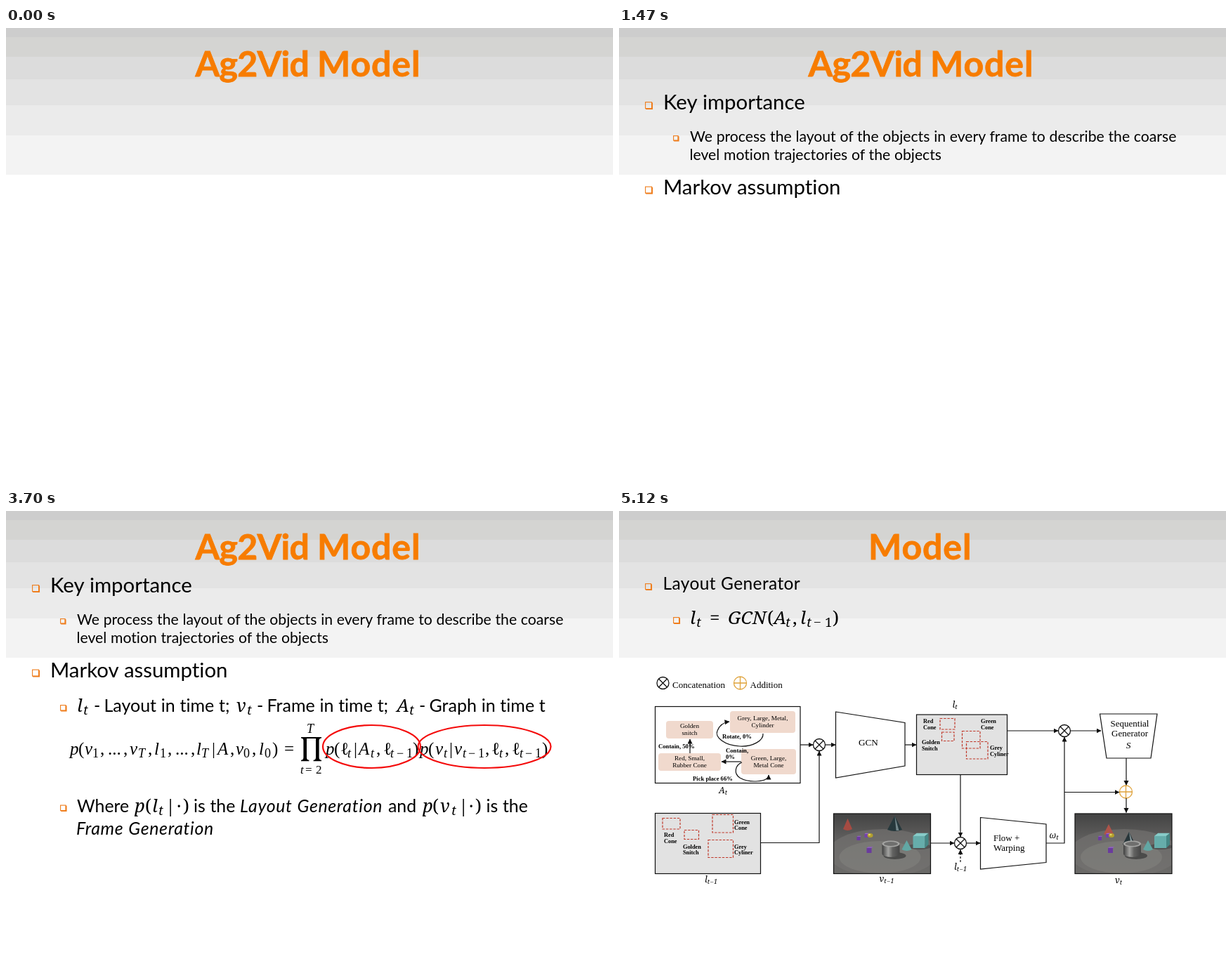
These frames come from a looping animation (864 by 648 pixels, 8 s). An HTML page:

```html
<!DOCTYPE html>
<html lang="en">
<head>
<meta charset="utf-8">
<title>Ag2Vid Model</title>
<style>
  html, body { margin: 0; width: 100%; height: 100%; overflow: hidden; background: #fff; }
  svg { display: block; width: 864px; height: 648px; }
  text { font-variant-ligatures: none; }
  .sans { font-family: Lato, Carlito, sans-serif; word-spacing: .015em; }
  .serif { font-family: "Liberation Serif", "Noto Serif", serif; }
  .noto { font-family: "Noto Serif", "Liberation Serif", serif; }
  .title { font-size: 50px; font-weight: 700; fill: #f77c00; stroke: #f77c00; stroke-width: .8px; }
  .it { font-style: italic; }
  .sans.it { letter-spacing: .7px; }
  .b { font-weight: 700; }
  .mid { text-anchor: middle; }
  .line { fill: none; stroke: #111; stroke-width: 1.2; }
  .box { fill: #fff; stroke: #111; stroke-width: 1.2; }
  .layout { fill: #e2e2e2; stroke: #111; stroke-width: 1.2; }
  .dash { fill: none; stroke: #c0392b; stroke-width: 1.2; stroke-dasharray: 3.4 1.8; }
  .pink { fill: #f0d9cd; }
  .ring { fill: none; stroke: #f40b0b; stroke-width: 2.2; }
</style>
</head>
<body>
<svg id="stage" viewBox="0 0 864 648" xmlns="http://www.w3.org/2000/svg"></svg>
<script>
const LOOP = 8000;

const text = (x, y, size, s, cls = 'sans') =>
  `<text x="${x}" y="${y}" font-size="${size}" class="${cls}">${s}</text>`;
const serif = (x, y, size, s, cls = '') => text(x, y, size, s, 'serif ' + cls);
const title = (x, s, spacing) =>
  `<text x="${x}" y="69" class="sans title" letter-spacing="${spacing}">${s}</text>`;
const rect = (x, y, x2, y2, cls, extra = '') =>
  `<rect x="${x}" y="${y}" width="${x2 - x}" height="${y2 - y}" class="${cls}" ${extra}/>`;
const fill = (d, color) => `<path d="${d}" fill="${color}"/>`;
const path = (d, cls = 'line', extra = '') => `<path d="${d}" class="${cls}" ${extra}/>`;
const arrow = (d, extra = '') => path(d, 'line', 'marker-end="url(#head)" ' + extra);
const oval = (cx, cy, rx, ry, color, extra = '') =>
  `<ellipse cx="${cx}" cy="${cy}" rx="${rx}" ry="${ry}" fill="${color}" ${extra}/>`;

// Small square with a heavier right and bottom edge
const bullet = (x, y, s) =>
  `<g fill="none" stroke="#ef7d1c"><rect x="${x + .6}" y="${y + .6}" width="${s - 2}" height="${s - 2}" stroke-width="1.1"/>` +
  `<path d="M${x + 1.2} ${y + s - .9}H${x + s - .9}V${y + 1.2}" stroke-width="1.9"/></g>`;

// Tokens are "x:glyphs"; a leading underscore sets a subscript
const math = (y, size, tokens, face = 'serif') => tokens.split(' ').map(tok => {
  const [x, body] = tok.split(/:(.+)/);
  const sub = body[0] === '_';
  const s = sub ? body.slice(1) : body;
  const runs = s.replace(/[A-Za-z]+/g, '<tspan font-style="italic">$&</tspan>');
  return text(x, sub ? y + size * .17 : y, sub ? size * .72 : size, runs, face);
}).join('');

// Centred variable with a subscript
const label = (x, y, v, sub) =>
  text(x, y, 12.5, `${v}<tspan font-size="9" dy="2.2">${sub}</tspan>`, 'noto it mid');

const cross = (cx, cy, r, turn, color) =>
  `<g transform="translate(${cx} ${cy}) rotate(${turn})" fill="none" stroke="${color}" stroke-width="1.3">` +
  `<circle r="${r}"/><path d="M${-r} 0H${r}M0 ${-r}V${r}"/></g>`;
const times = (x, y) => cross(x, y, 8.5, 45, '#111');
const plus = (x, y) => cross(x, y, 9, 0, '#dfa23a');

const stack = (x, y, step, size, lines, cls) =>
  lines.split('/').map((s, i) => serif(x, y + i * step, size, s, cls)).join('');
const tag = (x, y, lines) => stack(x, y, 8.7, 8.3, lines, 'b');
const node = (x, y, x2, y2, base, lines) =>
  rect(x, y, x2, y2, 'pink', 'rx="4"') + stack((x + x2) / 2, base, 10, 9.2, lines, 'mid');

function cone(x, y, w, h, color) {
  return fill(`M${x} ${y}L${x + w / 2} ${y + h}Q${x} ${y + h + 4} ${x - w / 2} ${y + h}Z`, color);
}
function cube(x, y, s, color, top) {
  return fill(`M${x} ${y}h${s}v${s}h${-s}z`, color) +
    fill(`M${x} ${y}l${s * .3} ${-s * .25}h${s}l${-s * .3} ${s * .25}z`, top);
}

// Rendered table-top scene; the two cones sit elsewhere once moved
function scene(x, moved) {
  const g = oval(70, 56, 78, 34, '#777673', 'opacity=".6"') +
    oval(66, 62, 58, 23, '#8a8986', 'opacity=".4"') +
    oval(87, 60, 16, 5, '#4b4b4a') + oval(122, 47, 17, 4, '#525252') +
    (moved ? cone(48, 15, 14, 14, '#ad5449') : cone(20, 7, 13, 15, '#a64b42')) +
    (moved ? cone(77, 26, 18, 18, '#28363a') : cone(87, 3, 21, 20, '#26383c')) +
    (moved ? fill('M77 26l3 20h4z', '#8d9da0') : fill('M87 3l2 21h4z', '#73878b')) +
    cube(44, 29, 5, '#7443a9', '#9a69cb') + cube(33, 33, 5, '#6c3aa0', '#8f62bd') +
    cube(47, 49, 7, '#6a3b9e', '#8f61bf') +
    oval(52, 31, 4, 3, '#b3a02e') + oval(51, 30, 1.6, 1.2, '#e2d466') +
    cube(113, 32, 17, '#66adab', '#87cbc8') + fill('M130 32l5 -4v16l-5 5z', '#458785') +
    cone(104, 38, 14, 13, '#62a7a4') +
    fill('M69 43V57A12.5 5 0 0 0 94 57V43Z', 'url(#steel)') +
    oval(81.5, 43, 12.5, 4.5, '#a5a5a3') + oval(81.5, 43, 10, 3, '#6f6f6e');
  return `<svg x="${x}" y="431" width="138" height="85.5" viewBox="0 0 138 85.5">` +
    `<rect width="138" height="85.5" fill="url(#floor)"/>${g}</svg>` +
    rect(x, 431, x + 138, 516.5, 'line');
}

const bands = [[0, 'cdcdcd'], [13, 'd4d4d2'], [41, 'dcdcdc'], [73, 'e3e3e3'],
  [110, 'ebebeb'], [153, 'f3f3f3'], [209, 'ffffff']]
  .map(([y, c]) => `<rect y="${y}" width="864" height="${648 - y}" fill="#${c}"/>`).join('');

const defs = `<defs>
  <marker id="head" markerUnits="userSpaceOnUse" markerWidth="8" markerHeight="8" refX="6.5" refY="3.5" orient="auto">
    <path d="M0 0L7 3.5L0 7Z" fill="#111"/></marker>
  <linearGradient id="floor" x2="0" y2="1"><stop stop-color="#434343"/><stop offset=".4" stop-color="#5e5d5c"/><stop offset="1" stop-color="#6c6b69"/></linearGradient>
  <linearGradient id="steel"><stop stop-color="#3f3f3f"/><stop offset=".35" stop-color="#a3a3a1"/><stop offset=".6" stop-color="#626261"/><stop offset="1" stop-color="#454545"/></linearGradient>
</defs>`;

const heading = title(269.5, 'Ag2Vid', -.7) + title(443, 'Model', .9);

const importance = bullet(37, 105, 11) + text(63, 116, 29.4, 'Key importance') +
  bullet(77, 153, 8.5) +
  text(101, 161.5, 21.2, 'We process the layout of the objects in every frame to describe the coarse') +
  text(100.5, 188, 21.2, 'level motion trajectories of the objects');

const markov = bullet(37, 225.5, 11) + text(63, 237, 29.4, 'Markov assumption');

const formula =
  bullet(77, 276, 9.5) +
  math(286, 25.5, '101:l 110:_t 328:v 343:_t 556:A 574:_t', 'noto') +
  text(125, 286, 25, '-') + text(139.5, 286, 25, 'Layout in time t;') +
  text(357, 286, 25, '-') + text(371.5, 286, 25, 'Frame in time t;') +
  text(588, 286, 25, '-') + text(602.5, 286, 25, 'Graph in time t') +
  math(346.5, 25, '91:p 103:( 112:v 123:_1 134:, 145:... 167:, 176:v 188:_T 202:, 211:l 219:_1 230:, ' +
    '241:... 263:, 271:l 278:_T 293:| 301:A 319:, 327:v 338:_0 350:, 360:l 368:_0 379:) 396:=') +
  math(346.5, 25, '455:p 467:( 476:ℓ 486:_t 495:| 502:A 519:_t 527:, 537:ℓ 547:_t 556:_− 570:_1 579:) ' +
    '589:p 601:( 611:v 623:_t 631:| 638:v 650:_t 658:_− 672:_1 682:, 691:ℓ 702:_t 710:, ' +
    '720:ℓ 731:_t 739:_− 753:_1 763:)') +
  fill('M420 322H449V323.4Q445.6 323.6 445.6 327V351Q445.6 354.6 449 354.8V356.2H437.6V354.8' +
    'Q441 354.6 441 351V324H428V351Q428 354.6 431.4 354.8V356.2H420V354.8' +
    'Q423.4 354.6 423.4 351V327Q423.4 323.6 420 323.4Z', '#000') +
  math(315.5, 18, '428:T') + math(373.5, 17, '419:t 426:= 441:2') +
  bullet(77, 418.5, 9.5) + text(101, 428.5, 24.8, 'Where') +
  math(428.5, 25.5, '183:p 198:( 208:l 217:_t 227:| 243:· 252:)', 'noto') +
  text(267, 428.5, 24.8, 'is the') +
  text(333, 428.5, 24.8, 'Layout Generation', 'sans it') +
  text(544, 428.5, 24.8, 'and') +
  math(428.5, 25.5, '593:p 607:( 618:v 634:_t 644:| 659:· 668:)', 'noto') +
  text(683.5, 428.5, 24.8, 'is the') +
  text(100, 461, 24.8, 'Frame Generation', 'sans it');

const ring = (cx, rx) => `<ellipse cx="${cx}" cy="335.5" rx="${rx}" ry="30.5" class="ring"/>`;

const sequential = bullet(37, 501, 12) + text(63.5, 513, 32.6, 'The frames are generated sequentially');

const graph = rect(51.5, 278.5, 258, 387.5, 'box') +
  node(67, 299, 134, 324, 309, 'Golden/snitch') +
  node(158, 285, 251, 316, 298, 'Grey, Large, Metal,/Cylinder') +
  node(56, 345, 145, 370, 355, 'Red, Small,/Rubber Cone') +
  node(174, 339, 252, 375, 355, 'Green, Large,/Metal Cone') +
  arrow('M101 345V325') + arrow('M174 357H146') +
  arrow('M205 317C206 327 190 336 172 335C150 334 136 322 140 313C143 305 149 301 157 300', 'stroke-width=".8"') +
  arrow('M175 358C165 362 163 374 172 380C186 388 213 386 213 376', 'stroke-width=".8"') +
  serif(56, 338, 8.7, 'Contain, 50%', 'b') + serif(147, 324, 8.7, 'Rotate, 0%', 'b') +
  stack(152, 344, 9, 8.7, 'Contain,/0%', 'b') + serif(105, 384, 8.6, 'Pick place 66%', 'b') +
  label(148, 401.5, 'A', 't');

const layouts = rect(423.5, 290, 552.5, 375.5, 'layout') +
  rect(457, 295.5, 478, 311, 'dash') + rect(459.5, 315, 477, 327.5, 'dash') +
  rect(488.5, 313.5, 514, 338, 'dash') + rect(494.5, 328.5, 525, 353, 'dash') +
  tag(433, 302, 'Red/Cone') + tag(431, 332, 'Golden/Snitch') +
  tag(515, 302, 'Green/Cone') + tag(528, 340, 'Grey/Cyliner') +
  label(478, 280, 'l', 't') +
  rect(51.5, 430.5, 201.5, 516.5, 'layout') +
  rect(62, 437.5, 87, 453, 'dash') + rect(93, 454.5, 113.5, 467.5, 'dash') +
  rect(133, 432.5, 162.5, 458, 'dash') + rect(127, 468.5, 162.5, 493.5, 'dash') +
  tag(64, 464, 'Red/Cone') + tag(91, 480.5, 'Golden/Snitch') +
  tag(164, 445.5, 'Green/Cone') + tag(164, 480.5, 'Grey/Cyliner') +
  label(131, 529, 'l', 't−1');

const pipeline =
  arrow('M258 333H276') + times(285, 333) + arrow('M294 333H308') +
  arrow('M201.5 472.5H285V342') +
  path('M308.5 286L407 301.5V363L308.5 380Z', 'box') + serif(341, 333.5, 13.2, 'GCN') +
  arrow('M407 333H423') +
  arrow('M552.5 313H625') + times(634, 313) + arrow('M642.5 313H686') +
  path('M684.5 289H766L757 352H694Z', 'box') +
  stack(727, 306.5, 14, 13, 'Sequential/Generator', 'mid') + serif(725, 338, 13.5, 'S', 'it mid') +
  arrow('M722 352V390.5') + plus(721.5, 400) + arrow('M722 409V429.5') +
  arrow('M486 375.5V464') + arrow('M443.5 473H477') + times(486, 473) + arrow('M494.5 473H514') +
  arrow('M486 500V482.5', 'stroke-dasharray="3 2"') + label(486, 510.5, 'l', 't−1') +
  path('M514.5 436.5L608 446V500.5L514.5 510Z', 'box') +
  stack(533, 470, 14, 13, 'Flow +/Warping') +
  label(619, 466, 'ω', 't') + arrow('M608 473H634V322') + arrow('M634 400.5H712') +
  scene(305.5, false) + label(381, 528, 'v', 't−1') +
  scene(649, true) + label(711, 530, 'v', 't');

const generator = title(355, 'Model', .9) +
  bullet(37, 103, 10) +
  `<g letter-spacing=".4">${text(62.5, 112, 24.5, 'Layout Generator')}</g>` +
  bullet(77, 151, 10) +
  math(161, 26, '101:l 110:_t 129:= 155:GCN 211:( 220:A 237:_t 247:, 258:l 267:_t 277:_− 293:_1 304:)', 'noto') +
  times(62.5, 245) + serif(76, 251.5, 13, 'Concatenation') +
  plus(172.5, 245) + serif(186.5, 251.5, 13, 'Addition') +
  graph + layouts + pipeline;

// [start, end, content]
const steps = [
  [0, 5120, heading],
  [760, 5120, importance],
  [1470, 5120, markov],
  [2230, 5120, formula],
  [2940, 5120, ring(520.5, 69.5)],
  [3700, 5120, ring(681, 94.5)],
  [4410, 5120, sequential],
  [5120, LOOP, generator]
];

const stage = document.getElementById('stage');
stage.innerHTML = defs + bands +
  steps.map(s => `<g class="step" visibility="hidden">${s[2]}</g>`).join('');
const groups = stage.querySelectorAll('.step');
const begin = performance.now();

function draw() {
  const t = (performance.now() - begin) % LOOP;
  steps.forEach(([from, to], i) =>
    groups[i].setAttribute('visibility', t >= from && t < to ? 'visible' : 'hidden'));
  requestAnimationFrame(draw);
}
draw();
</script>
</body>
</html>
```
